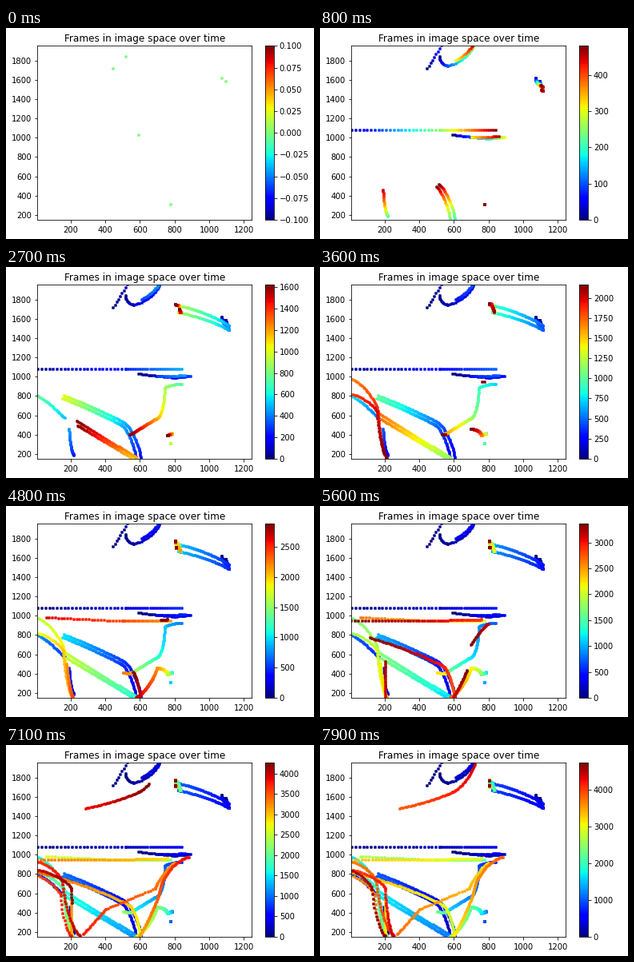
These frames come from a looping animation (385x264 px, 8000 ms). A matplotlib script:

```python
import numpy as np
import matplotlib.pyplot as plt
from matplotlib.animation import FuncAnimation

W, H, DPI = 385, 264, 72
FRAMES, STEP, SAMPLE = 80, 60, 10
rows = []


def trip(t, x, y, *legs):
    """Record a path of legs (end time, x, y, bend).

    A positive bend sets out vertically and arrives horizontally,
    a negative bend does the reverse and zero is a straight line.
    """
    for t1, x1, y1, bend in legs:
        times = np.arange(t, t1 + 1, SAMPLE)
        u = (times - t) / (t1 - t)
        late = u ** (1 + abs(bend))
        early = 1 - (1 - u) ** (1 + abs(bend))
        fx, fy = (late, early) if bend >= 0 else (early, late)
        rows.append(np.column_stack([times, x + (x1 - x) * fx, y + (y1 - y) * fy]))
        t, x, y = t1, x1, y1


# top left
trip(0, 448, 1710, (80, 530, 1950, 0))
trip(0, 520, 1840, (100, 568, 1742, .8), (280, 715, 1950, -.4))
trip(300, 612, 1795, (440, 708, 1948, -.2))
trip(3850, 288, 1475, (4180, 600, 1650, -.15), (4400, 725, 1950, -.3))

# top right, where two objects come to rest
trip(0, 1072, 1615, (450, 1113, 1525, .5), (900, 835, 1728, .2),
     (1620, 808, 1743, 0), (2880, 806, 1772, 0), (4740, 805, 1760, 0))
trip(0, 1095, 1585, (450, 1115, 1478, 0), (900, 825, 1660, .2),
     (1400, 837, 1660, 0), (1900, 817, 1752, 0), (2150, 835, 1668, 0))
trip(2300, 810, 1700, (4740, 806, 1715, 0))

# middle rows
trip(20, 15, 1080, (250, 520, 1080, 0), (480, 845, 1080, 0))
trip(0, 595, 1025, (180, 800, 985, 0), (300, 893, 1003, 0))
trip(310, 703, 1003, (460, 860, 1007, 0))
trip(2150, 778, 948, (2400, 500, 940, 0), (2650, 62, 978, 0))
trip(2810, 760, 957, (3350, 10, 940, .5))

# lower right
trip(720, 845, 922, (900, 745, 878, -.5), (1200, 690, 555, .8), (1620, 545, 395, 0))
trip(2100, 555, 396, (2250, 505, 405, 0))
trip(0, 778, 305, (960, 778, 305, 0))
trip(1100, 790, 410, (1620, 760, 388, 0), (2160, 700, 455, .7), (2700, 580, 150, .3))
trip(3100, 600, 155, (3500, 715, 600, -.1), (3850, 885, 970, .5))
trip(3150, 800, 910, (3400, 690, 645, -.2), (3600, 405, 430, 0), (3780, 275, 170, 0))

# long arcs from the bottom to the left
for d in (0, 28):
    trip(200 + d, 608 - d, 150, (500, 508 - d / 2, 525 - d, .35),
         (1000, 165 - d / 3, 800 - d, .05))
    trip(1150 - d, 585 - d, 155, (1720, 165 + d / 3, 620 - 2 * d, 0))
trip(2700, 605, 150, (2950, 540, 470, .4), (3450, 10, 815, .15))

# lower left
trip(500, 168, 570, (680, 66, 740, 0), (760, 10, 802, 0))
trip(200, 222, 185, (450, 195, 455, -.5))
trip(2180, 180, 500, (2400, 215, 160, .3))
trip(3100, 205, 160, (3260, 206, 520, 0))

# in from the left edge, round an elbow and out at the bottom
for t0, t1, y, ex, ey, x in ((1650, 2150, 970, 165, 640, 215),
                             (1820, 2200, 815, 160, 630, 213),
                             (3560, 3800, 775, 145, 570, 205),
                             (3650, 4080, 925, 155, 720, 258),
                             (4000, 4430, 840, 205, 650, 252),
                             (4480, 4740, 830, 130, 640, 205)):
    trip(t0, 10, y, ((t0 + t1) // 20 * 10, ex, ey, -.35), (t1, x, 155, .4))

data = np.vstack(rows)
data = data[np.argsort(data[:, 0], kind="stable")]

fig = plt.figure(figsize=(W / DPI, H / DPI), dpi=DPI, facecolor="white")


def panel(x, w):
    return fig.add_axes([x / W, 24.1 / H, w / W, 217.44 / H])


ax, cax = panel(39.3, 267.84), panel(323.9, 10.87)
ax.set(xlim=(10, 1245), ylim=(150, 1950))
ax.set_title("Frames in image space over time", pad=5)
ax.tick_params(axis="x", pad=4.4)
dots = ax.scatter(data[:, 1], data[:, 2], c=data[:, 0], s=4, marker="s",
                  linewidths=1.5, edgecolors="face", cmap="jet")
fig.colorbar(dots, cax=cax)


def draw(k):
    now = k * STEP
    seen = data[data[:, 0] <= now]
    dots.set_offsets(seen[:, 1:])
    dots.set_array(seen[:, 0])
    dots.set_clim(*((0, now) if now else (-0.1, 0.1)))
    return [dots]


anim = FuncAnimation(fig, draw, frames=FRAMES, interval=100, repeat=True,
                     repeat_delay=0, blit=False)
plt.show()
```
